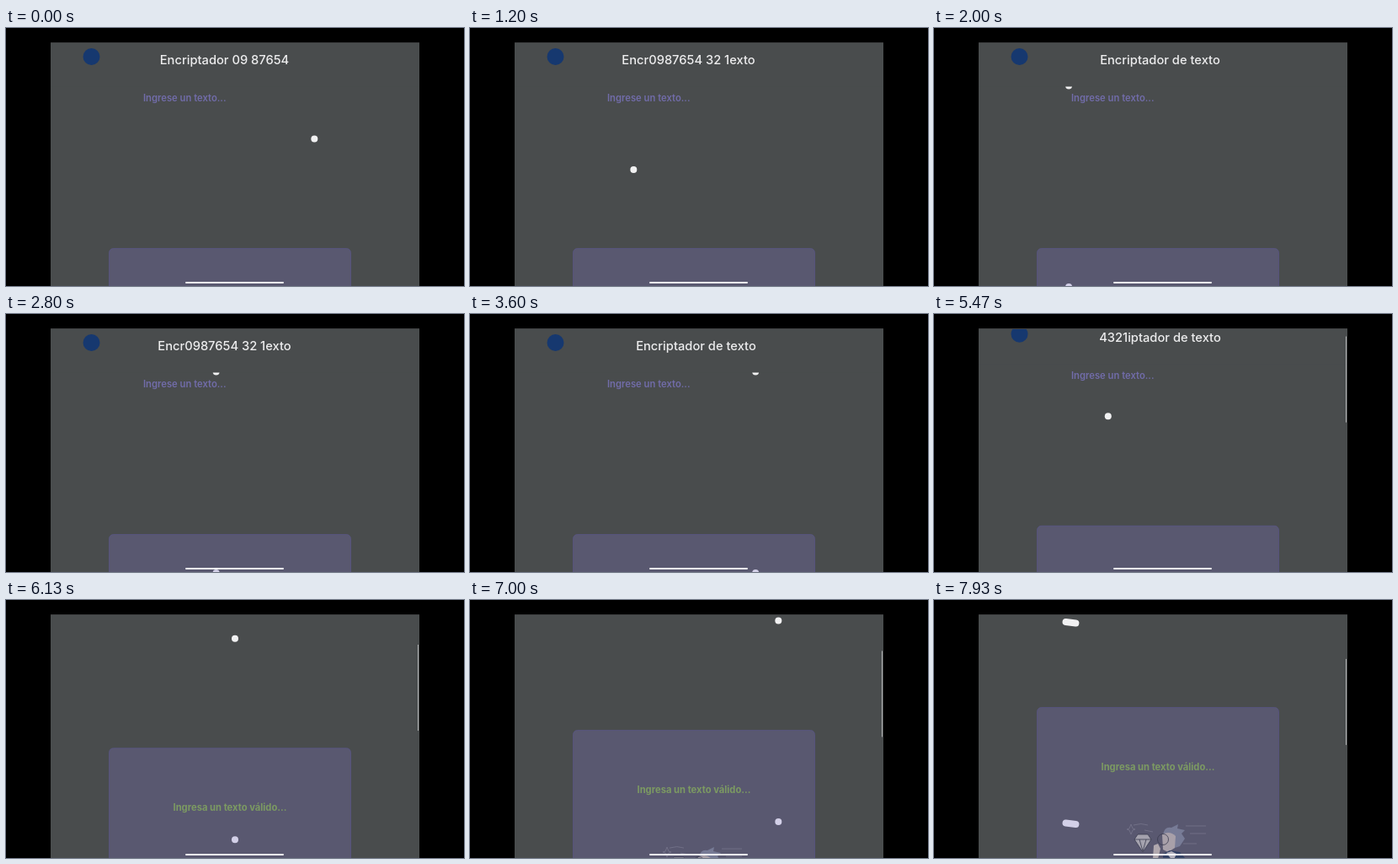
Write an HTML page that moves like this. It is 544 px wide and 306 px high and loops after 8000 ms.

```html
<!DOCTYPE html>
<html lang="es">
<head>
<meta charset="utf-8">
<title>Encriptador de texto</title>
<style>
  html, body { margin: 0; width: 100%; height: 100%; overflow: hidden; background: #000; }
  svg { display: block; width: 544px; height: 306px; }
  text { font-family: Inter, "Open Sans", sans-serif; }
  .title { font-size: 14.7px; font-weight: 500; fill: #ededee; text-anchor: middle; }
  .prompt { font-size: 11.25px; font-weight: 600; fill: #716ca9; }
  .notice { font-size: 11.2px; font-weight: 700; fill: #7c9a62; text-anchor: middle; }
  .ink { fill: none; stroke: #3a3b50; stroke-width: .8; }
  .faint { fill: none; stroke: #77758c; stroke-width: .8; }
</style>
</head>
<body>
<svg viewBox="0 0 544 306">
  <defs>
    <clipPath id="screen"><rect x="53" y="18" width="438" height="288"/></clipPath>
    <line id="dot" stroke="#f1f1f2" stroke-width="8" stroke-linecap="round"/>
  </defs>
  <rect x="53" y="17" width="438" height="289" fill="#494c4d"/>
  <g clip-path="url(#screen)">
    <g id="page">
      <use href="#dot" y="-238.5"/>
      <use href="#dot"/>
      <use href="#dot" y="238.5"/>
      <rect x="53" width="438" height="69.5" fill="#494c4d"/>
      <circle cx="101.5" cy="34" r="10" fill="#16386f"/>
      <text id="title" class="title" y="43"></text>
      <text class="prompt" x="163" y="87">Ingrese un texto...</text>
      <rect x="122.5" y="261.5" width="287" height="420" rx="5" fill="#847acc" fill-opacity=".275" stroke="#5d58a0" stroke-opacity=".45"/>
      <text class="notice" x="266" y="336">Ingresa un texto válido...</text>
      <path class="faint" d="M237 401q9-3 17 0M299 402h24M304 411h19M296 423h16M250 407l10 2"/>
      <path class="faint" d="M234 400l2 5 3 1-3 1-2 5-2-5-3-1 3-1z"/>
      <path d="M242 412h12l4 6-10 15-10-15z" fill="#a4a2ae"/>
      <path class="ink" d="M242 412h12l4 6-10 15-10-15zM238 418h20M244 418l4 14 4-14"/>
      <path d="M272 412q2-10 10-8l8-4-1 5 9 2-4 4 4 6-6 9-9 3z" fill="#777b96"/>
      <path d="M271 412q9-5 16 2l-1 14-8 5-6-3z" fill="#a8a0a9"/>
      <circle class="ink" cx="272" cy="418" r="6.5"/>
      <path d="M261 425l5-2 3 6-3 12h-6z" fill="#b0a8ae"/>
      <path d="M272 435l8-4 12 2 7 8v20h-27z" fill="#344265"/>
      <path d="M276 434l6-2 6 3-4 9z" fill="#b4b2bd"/>
    </g>
    <rect id="thumb" x="489" width="1" height="102" fill="#b3b4b5"/>
  </g>
  <path d="M53 17.5h438" stroke="#3f4041"/>
  <rect x="213" y="301" width="117" height="2" rx="1" fill="#f5f5f6"/>
</svg>
<script>
const LOOP = 8000;
const PHRASE = "Encriptador de texto", DIGITS = "0987654321";
const SWEEP = { lead: 1130, period: 1590, step: 52 };
const BLUR = 55, MAX_TRAIL = 12, FLIGHT = 300, DOT_LOOP = 7000;

// The dot runs along three rows and flies back between them.
const rows = [
  { begin: 830, end: 1400, from: 104, to: 205, y: 169, power: 0.26, hop: 9 },
  { begin: 1500, end: 3930, from: 104, to: 376, y: 68.5, power: 1, hop: 0 },
  { begin: 4100, end: 7330, from: 104, to: 404, y: 131.5, power: 1.25, hop: 0 }
];

const byId = id => document.getElementById(id);
const dot = byId("dot"), page = byId("page"), title = byId("title"), thumb = byId("thumb");
const clamp = (v, low, high) => Math.min(high, Math.max(low, v));
const mix = (a, b, k) => a + (b - a) * k;
const smooth = k => k * k * (3 - 2 * k);
const glide = (t, begin, distance, decay) =>
  distance * (1 - Math.exp(-Math.max(0, t - begin) / decay));

const scrollAt = t => glide(t, 5425, 111, 477) + glide(t, 7050, 23.6, 100);

function dotAt(t) {
  const first = rows[0].begin;
  const u = first + (t - first + DOT_LOOP) % DOT_LOOP;
  const i = rows.findLastIndex(row => row.begin <= u);
  const row = rows[i], next = rows[(i + 1) % rows.length];
  if (u < row.end) {
    const k = ((u - row.begin) / (row.end - row.begin)) ** row.power;
    return [mix(row.from, row.to, k), row.y - row.hop * Math.sin(Math.PI * k) ** 2];
  }
  const landing = next === rows[0] ? next.begin + DOT_LOOP : next.begin;
  const time = Math.min(FLIGHT, landing - row.end);
  const k = smooth(clamp(1 - (landing - u) / time, 0, 1));
  return [mix(row.to, next.from, k), mix(row.y, next.y, k)];
}

function drawDot(t) {
  const [x1, y1] = dotAt(t), [px, py] = dotAt(t - BLUR);
  const distance = Math.hypot(px - x1, py - y1);
  const k = distance > 8 ? Math.min(1, MAX_TRAIL / distance) : 0;
  const ends = { x1, y1, x2: mix(x1, px, k) + 0.01, y2: mix(y1, py, k) };
  Object.entries(ends).forEach(([name, value]) => dot.setAttribute(name, value));
}

// A run of digits slides right over the letters, skipping spaces.
function drawTitle(t) {
  const first = Math.floor((t + SWEEP.lead) % SWEEP.period / SWEEP.step) - DIGITS.length;
  let n = 0, shown = 0;
  title.textContent = PHRASE.replace(/\S/g, letter => {
    const digit = DIGITS[n++ - first];
    if (digit) shown++;
    return digit || letter;
  });
  title.setAttribute("x", 268.5 - clamp(3 * (shown - 4), 0, 9));
}

function render(t) {
  const scroll = scrollAt(t);
  page.setAttribute("transform", `translate(0 ${-scroll})`);
  thumb.setAttribute("y", 23 + scroll * 0.35);
  thumb.setAttribute("opacity", scroll > 0 ? 1 : 0);
  drawDot(t);
  drawTitle(t);
}

const begin = performance.now();
function tick() {
  render((performance.now() - begin) % LOOP);
  requestAnimationFrame(tick);
}
tick();
</script>
</body>
</html>
```
